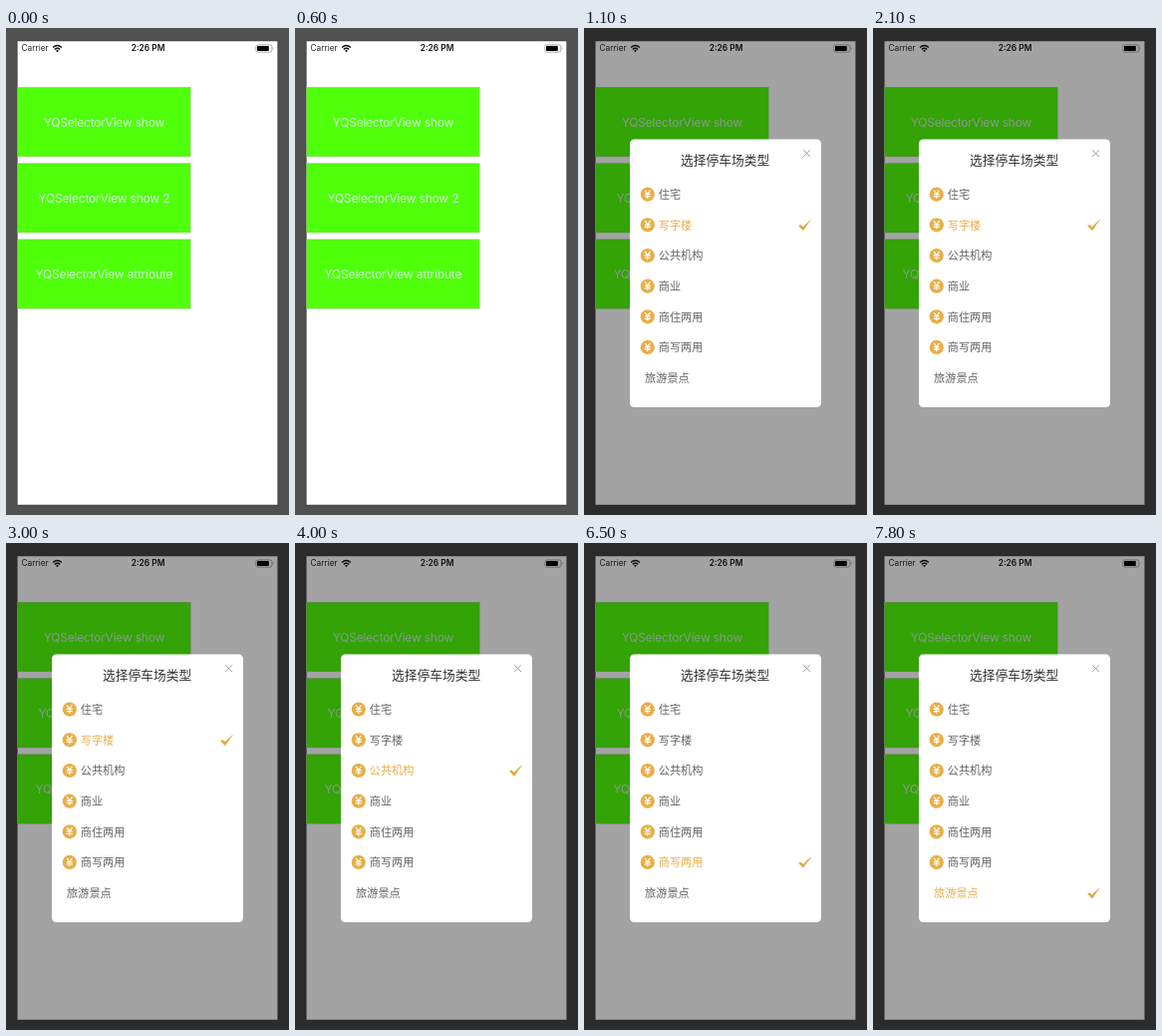
An HTML page for the animation above (8 s loop, 284 by 488 pixels).

```html
<!DOCTYPE html>
<html lang="zh-CN">
<head>
<meta charset="utf-8">
<style>
html, body { margin: 0; width: 100%; height: 100%; overflow: hidden; }
svg { display: block; width: 284px; height: 488px; }
text { font-family: Inter, "Noto Sans CJK SC", "Noto Sans CJK", sans-serif; }
.button rect { fill: #50ff0a; stroke: #9aa79a; stroke-opacity: .45; stroke-width: .8; }
.button text { fill: #d0eed8; font-size: 12px; letter-spacing: -.2px; text-anchor: middle; }
.row text { fill: #626262; font-size: 11.2px; }
.row .check { visibility: hidden; }
.row.on text { fill: #e8ae48; }
.row.on .check { visibility: visible; }
</style>
</head>
<body>
<svg viewBox="0 0 284 488">
  <defs>
    <g id="coin">
      <circle r="7.1" fill="#e8ae48"/>
      <path d="M-2.7-4.2 0-.6 2.7-4.2M0-.6V4.2M-3-.3H3M-3 2H3" fill="none" stroke="#fff" stroke-width="1.2"/>
    </g>
    <path id="tick" d="M-6.2.8-4.1-.4-1.5 2Q2-2.4 6.3-5.2L6.6-4.8Q2.4-.6-.9 5.4H-1.9Z" fill="#e0a844"/>
  </defs>
  <rect id="frame" width="284" height="488"/>
  <rect x="11.3" y="13" width="261.4" height="465" fill="#fff" stroke="#222" stroke-opacity=".55" stroke-width=".8"/>
  <g id="buttons"></g>
  <g id="status">
    <text x="15.5" y="23.4" font-size="8.3" fill="#222">Carrier</text>
    <g fill="none" stroke="#111" stroke-width="1.4">
      <path d="M47.1 19.6Q51.5 15.6 55.9 19.6M48.8 21.5Q51.5 19.1 54.2 21.5"/>
    </g>
    <path d="M50 22.7Q51.5 21.4 53 22.7L51.5 24.3Z" fill="#111"/>
    <text x="142.6" y="23.4" font-size="8.4" font-weight="600" text-anchor="middle" fill="#111">2:26 PM</text>
    <rect x="250.9" y="16.9" width="16" height="7.2" rx="1.8" fill="none" stroke="#888" stroke-width=".7"/>
    <rect x="252" y="18" width="11.8" height="5" rx=".8" fill="#000"/>
    <path d="M267.8 19.3Q269.2 20.5 267.8 21.7Z" fill="#888"/>
  </g>
  <g id="popup">
    <rect x="11.3" y="13" width="261.4" height="465" opacity=".36"/>
    <rect x="46" y="111.5" width="192" height="268.5" rx="4.5" fill="#fff"/>
    <text x="141.7" y="136.7" font-size="12.75" text-anchor="middle" fill="#333">选择停车场类型</text>
    <path d="M220.2 122.2l6.8 6.8m0-6.8l-6.8 6.8" stroke="#8c8c8c" stroke-width=".8"/>
    <g id="rows"></g>
  </g>
</svg>
<script>
const $ = id => document.getElementById(id);
const LOOP = 8000, DARKEN = 1000, OPEN = 1100;
const labels = ['YQSelectorView show', 'YQSelectorView show 2', 'YQSelectorView attribute'];
const types = ['住宅', '写字楼', '公共机构', '商业', '商住两用', '商写两用', '旅游景点'];
// start time and selected row
const picks = [[0, 1], [3800, 2], [4500, 3], [5500, 4], [6000, 5], [7000, 6]];

$('buttons').innerHTML = labels.map((label, i) => `
  <g class="button" transform="translate(0 ${59.4 + 76.2 * i})">
    <rect x="11.5" width="173.7" height="69.4"/>
    <text x="98.4" y="39.2">${label}</text>
  </g>`).join('');

$('rows').innerHTML = types.map((type, i) => {
  const last = i === types.length - 1;
  return `<g class="row" transform="translate(0 ${166.7 + 30.65 * i})">
    ${last ? '' : '<use href="#coin" x="63.8"/>'}
    <text x="${last ? 61 : 74.7}" y="4.2">${type}</text>
    <use class="check" href="#tick" x="221.4"/>
  </g>`;
}).join('');
const rows = [...$('rows').children];

function draw() {
  const t = performance.now() % LOOP;
  const selected = picks.filter(([start]) => t >= start).pop()[1];
  $('frame').setAttribute('fill', t < DARKEN ? '#505050' : '#2c2c2c');
  $('popup').style.display = t < OPEN ? 'none' : '';
  rows.forEach((row, i) => row.classList.toggle('on', i === selected));
  requestAnimationFrame(draw);
}
draw();
</script>
</body>
</html>
```
